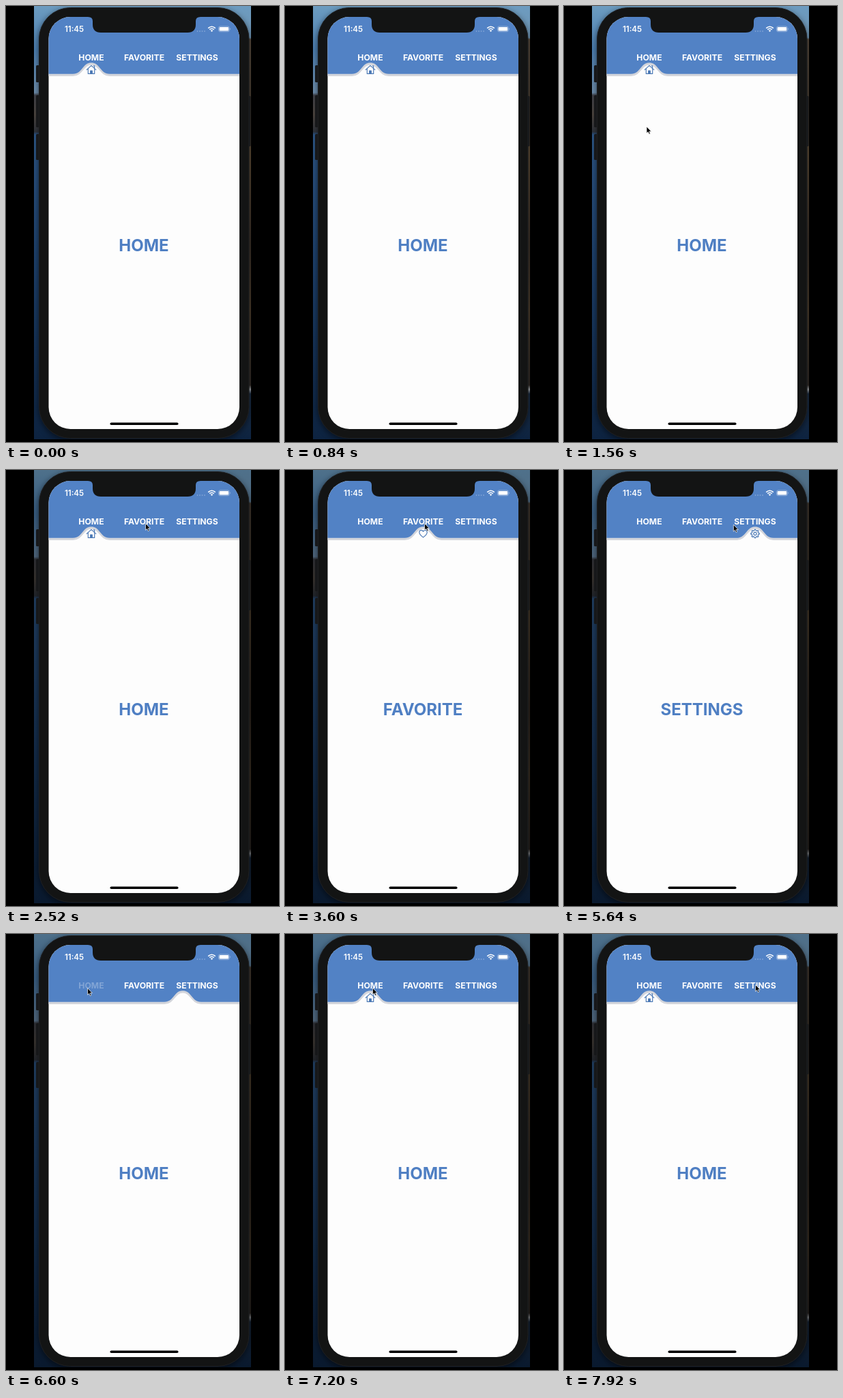
An HTML page for the animation above (8000 ms loop, 400x640 px).

```html
<!DOCTYPE html>
<html lang="en">
<head>
<meta charset="utf-8">
<title>Tab bar</title>
<style>
  html, body { margin: 0; width: 100%; height: 100%; overflow: hidden; background: #000; }
  svg { display: block; width: 400px; height: 640px; }
  text { font-family: Inter, sans-serif; font-weight: 700; }
  .icon { fill: none; stroke: #4a78b5; stroke-width: 1.15; stroke-linejoin: round; stroke-linecap: round; }
</style>
</head>
<body>
<svg viewBox="0 0 400 640">
  <defs>
    <linearGradient id="left" x2="0" y2="1">
      <stop offset="0" stop-color="#6d9cc0"/>
      <stop offset=".1" stop-color="#4d80b2"/>
      <stop offset=".2" stop-color="#6f8fae"/>
      <stop offset=".206" stop-color="#40424a"/>
      <stop offset=".25" stop-color="#4c453f"/>
      <stop offset=".29" stop-color="#30343c"/>
      <stop offset=".297" stop-color="#2d5686"/>
      <stop offset=".6" stop-color="#1d406b"/>
      <stop offset="1" stop-color="#0d2340"/>
    </linearGradient>
    <linearGradient id="right" x2="0" y2="1">
      <stop offset="0" stop-color="#6d9cc0"/>
      <stop offset=".073" stop-color="#6e93b2"/>
      <stop offset=".077" stop-color="#584b3e"/>
      <stop offset=".2" stop-color="#4b4034"/>
      <stop offset=".34" stop-color="#5b4a35"/>
      <stop offset=".55" stop-color="#3a3028"/>
      <stop offset=".7" stop-color="#4b3d2c"/>
      <stop offset=".875" stop-color="#302a26"/>
      <stop offset=".885" stop-color="#a3a7ab"/>
      <stop offset=".895" stop-color="#1b2c42"/>
      <stop offset="1" stop-color="#0d2340"/>
    </linearGradient>
    <filter id="soft" x="-10%" y="-10%" width="120%" height="120%"><feGaussianBlur stdDeviation="4"/></filter>
    <filter id="blur" x="-10%" y="-50%" width="120%" height="200%"><feGaussianBlur stdDeviation=".6"/></filter>
    <clipPath id="wall"><rect x="41" width="318" height="636"/></clipPath>
    <clipPath id="screen"><rect x="62.5" y="16" width="279.5" height="605" rx="32"/></clipPath>
  </defs>

  <rect width="400" height="640"/>
  <g clip-path="url(#wall)">
    <rect x="41" width="160" height="636" fill="url(#left)"/>
    <rect x="200" width="159" height="636" fill="url(#right)"/>
    <rect x="47" y="4" width="310" height="634" rx="48" filter="url(#soft)" opacity=".5"/>
    <rect id="shade" x="41" width="318" height="636"/>
  </g>

  <g fill="#17181a">
    <rect x="44" y="87" width="6" height="25" rx="1.5"/>
    <rect x="44" y="131" width="6" height="47" rx="1.5"/>
    <rect x="44" y="188" width="6" height="38" rx="1.5"/>
    <rect x="354" y="132" width="4.5" height="74" rx="1.5"/>
  </g>
  <rect x="48.5" y="2.5" width="307.5" height="632" rx="46" fill="#131414" stroke="#1f2022"/>

  <g clip-path="url(#screen)">
    <rect x="62" y="16" width="281" height="606" fill="#fdfdfd"/>
    <path id="edge" fill="none" stroke="#d3d5db" stroke-width="3.6" filter="url(#blur)"/>
    <path id="header" fill="#5282c5"/>
  </g>
  <path d="M120 15V16Q127 16 127 22V27Q127 39 139 39H266Q278 39 278 27V22Q278 16 285 16V15Z" fill="#131414"/>

  <g fill="#fff">
    <text x="100" y="38" text-anchor="middle" font-size="11.5" style="font-weight:600">11:45</text>
    <g opacity=".4">
      <circle cx="280.5" cy="37" r=".8"/><circle cx="284" cy="37" r=".8"/>
      <circle cx="287.5" cy="37" r=".8"/><circle cx="291" cy="37" r=".8"/>
    </g>
    <path d="M301.5 38L299.6 36Q301.5 34.5 303.4 36Z"/>
    <path d="M296.2 32.6Q301.5 27.9 306.8 32.6M298.2 34.7Q301.5 31.8 304.8 34.7" fill="none" stroke="#fff" stroke-width="1.6"/>
    <rect x="311.5" y="29.9" width="15.8" height="7.8" rx="2.3" fill="none" stroke="#fff" stroke-width=".7" opacity=".5"/>
    <rect x="312.6" y="31" width="13.6" height="5.6" rx="1.4"/>
    <path d="M328.2 32.5Q329.6 33.8 328.2 35.1Z" opacity=".6"/>
  </g>

  <g id="tabs" fill="#fff" font-size="12.2" text-anchor="middle"></g>
  <g id="icons">
    <g class="icon" transform="translate(125 93.5)">
      <path d="M-6.8 .2L0-6.2L6.8 .2M-4.7-1.4V5.9H4.7V-1.4M3.3-5.6H4.7V-2.2"/>
      <path d="M-1.3 5.8V1.6H1.3V5.8Z" fill="#4a78b5"/>
    </g>
    <g class="icon" transform="translate(202.5 93.5)">
      <path d="M0 5.4C-3.5 2.8-5.7 .6-5.7-2C-5.7-5.6-1.6-6.3 0-3.2C1.6-6.3 5.7-5.6 5.7-2C5.7 .6 3.5 2.8 0 5.4Z"/>
    </g>
    <g class="icon" transform="translate(280 93.5)">
      <path id="gear"/>
      <circle r="2.1"/>
    </g>
  </g>

  <text id="title" x="202" y="360" text-anchor="middle" font-size="24" fill="#4f7fc3"></text>
  <rect x="152.5" y="611.5" width="100" height="3.6" rx="1.8"/>
  <path id="cursor" d="M0 0V9.8L2.2 7.8L3.7 11.2L5.4 10.4L3.9 7.2H6.9Z" stroke="#fff" stroke-width=".7"/>
</svg>
<script>
const $ = id => document.getElementById(id);
const LOOP = 8000, STEP = 120, SLIDE = 500;
const tabs = [['HOME', 125], ['FAVORITE', 202.5], ['SETTINGS', 280]];
const taps = [{ at: 2850, from: 0, to: 1 }, { at: 4660, from: 1, to: 2 }, { at: 6470, from: 2, to: 0 }];
// time, x, y of the pointer
const route = [
  [1320, 121, 177], [1680, 121, 177], [2400, 204.5, 78.5], [3840, 204.5, 78.5],
  [4440, 273.5, 80.5], [5400, 273.5, 80.5], [6240, 119.5, 79.5],
  [7080, 119.5, 79.5], [7800, 280.5, 74.5], [LOOP, 280.5, 74.5]
];

const clamp = v => Math.max(0, Math.min(1, v));
const mix = (a, b, p) => a + (b - a) * p;
const inOut = p => p < .5 ? 2 * p * p : 1 - 2 * (1 - p) ** 2;

const labels = tabs.map(([name, x]) => {
  const el = document.createElementNS('http://www.w3.org/2000/svg', 'text');
  el.setAttribute('x', x);
  el.setAttribute('y', 79.5);
  el.textContent = name;
  return $('tabs').appendChild(el);
});
const icons = [...$('icons').children];

$('gear').setAttribute('d', 'M' + Array.from({ length: 32 }, (_, i) => {
  const a = (i - .5) * Math.PI / 16, r = i % 4 < 2 ? 6.3 : 4.7;
  return (r * Math.cos(a)).toFixed(2) + ' ' + (r * Math.sin(a)).toFixed(2);
}).join('L') + 'Z');

const wave = (c, y) =>
  `M60 ${y}H${c - 27}C${c - 13} ${y} ${c - 13} ${y - 16.5} ${c} ${y - 16.5}` +
  `S${c + 13} ${y} ${c + 27} ${y}H345`;

function pointer(t) {
  const i = route.findIndex(p => p[0] > t);
  if (i < 1) return null;
  const [a, b] = [route[i - 1], route[i]];
  const p = inOut((t - a[0]) / (b[0] - a[0]));
  return [mix(a[1], b[1], p), mix(a[2], b[2], p)];
}

function fade(index, t) {
  const tap = taps.find(k => k.to === index);
  const dt = t - tap.at;
  if (dt < -60 || dt > 400) return 1;
  return dt < 150 ? mix(1, .28, clamp((dt + 60) / 60)) : mix(.28, 1, inOut((dt - 150) / 250));
}

function draw(t) {
  const tap = taps.filter(k => k.at <= t).pop() || { at: -LOOP, from: 0, to: 0 };
  const dt = t - tap.at;
  const c = mix(tabs[tap.from][1], tabs[tap.to][1], inOut(clamp(dt / SLIDE)));
  $('header').setAttribute('d', wave(c, 99.7) + 'V10H60Z');
  $('edge').setAttribute('d', wave(c, 101.2));
  $('title').textContent = tabs[tap.to][0];
  labels.forEach((el, i) => el.setAttribute('opacity', fade(i, t)));
  icons.forEach((el, i) => el.setAttribute('opacity', i === tap.to ? clamp((dt - 400) / 200) : 0));
  $('shade').setAttribute('opacity', t < 2040 ? 0 : .28);
  const pos = pointer(t);
  $('cursor').setAttribute('visibility', pos ? 'visible' : 'hidden');
  if (pos) $('cursor').setAttribute('transform', `translate(${pos})`);
}

const start = performance.now();
function tick() {
  const t = (performance.now() - start) % LOOP;
  draw(Math.floor(t / STEP) * STEP);
  requestAnimationFrame(tick);
}
tick();
</script>
</body>
</html>
```
